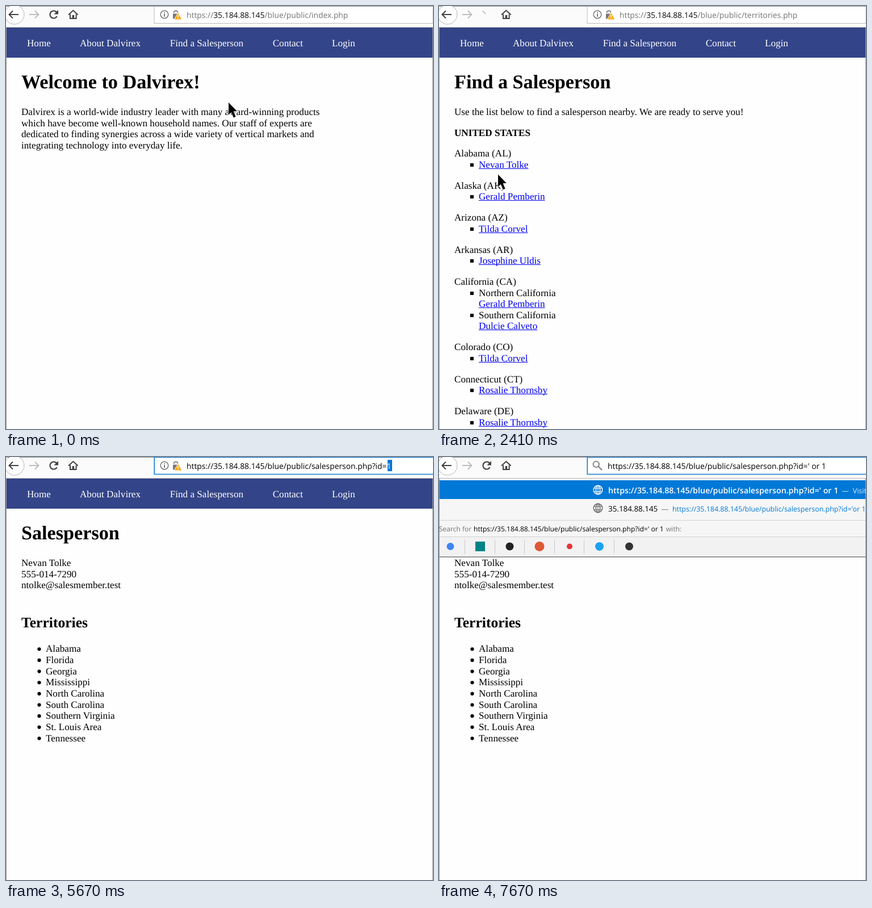
An HTML page with a canvas for the animation above (8 s loop, 752x745 px).

```html
<!DOCTYPE html>
<html lang="en">
<head>
<meta charset="utf-8">
<title>Find a Salesperson</title>
<style>
html, body { margin: 0; width: 100%; height: 100%; overflow: hidden; background: #fefefe; }
canvas { display: block; }
</style>
</head>
<body>
<canvas id="stage" width="752" height="745"></canvas>
<script>
const ctx = document.getElementById("stage").getContext("2d");
ctx.textRendering = "geometricPrecision";
const LOOP = 8000;
const SERIF = '"Liberation Serif", "Times New Roman", serif';
const UI = '"Open Sans", "Noto Sans", sans-serif';
const BODY = "17.14px " + SERIF;
const URL_FONT = "13.85px " + UI;
const LINE = 19.65, GAP = 17.07;
const NAVY = "#334488", BLUE = "#0078d7", GREY = "#737373", INK = "#404040";

const HOST = "35.184.88.145";
const DIR = "/blue/public/";
const PERSON_URL = "https://" + HOST + DIR + "salesperson.php?id=";

// Screen updates come in bursts: first time, last time, number of updates.
const BURSTS = [[0, 0, 1], [120, 260, 2], [550, 700, 2], [1260, 2280, 8], [2410, 3240, 7],
  [3500, 4500, 8], [4620, 5550, 8], [5670, 5670, 1], [6540, 7370, 7], [7670, 7670, 1]];

// Pointer path: time, x, y
const PATH = [[0, 392, 170], [120, 374, 122], [260, 357, 77], [549, 357, 77], [550, 357, 70],
  [700, 357, 66], [1420, 357, 66], [1990, 206, 235], [2135, 138, 284], [2280, 104, 298],
  [2700, 104, 294], [3240, 103, 272], [3650, 103, 272], [3930, 260, 210], [4220, 520, 95],
  [4500, 658, 32], [4640, 666, 28], [4890, 684, 16], [5550, 688, 15]];

function snap(t) {
  const [a, b, n] = BURSTS.filter(u => u[0] <= t).pop();
  if (n < 2) return a;
  const gap = (b - a) / (n - 1);
  return a + gap * Math.min(n - 1, Math.floor((t - a + 10) / gap));
}

function pointerAt(t) {
  const i = PATH.findIndex(p => p[0] > t);
  if (i < 0) return PATH[PATH.length - 1].slice(1);
  const [t0, x0, y0] = PATH[i - 1], [t1, x1, y1] = PATH[i];
  const k = (t - t0) / (t1 - t0);
  return [x0 + (x1 - x0) * k, y0 + (y1 - y0) * k];
}

// Returns the x where the text ends.
function text(str, x, y, font = BODY, color = "#000") {
  ctx.font = font;
  ctx.fillStyle = color;
  ctx.fillText(str, x, y);
  return x + ctx.measureText(str).width;
}

function rect(x, y, w, h, color) {
  ctx.fillStyle = color;
  ctx.fillRect(x, y, w, h);
}

function disc(x, y, r, color) {
  ctx.fillStyle = color;
  ctx.beginPath();
  ctx.arc(x, y, r, 0, 7);
  ctx.fill();
}

function ring(x, y, r, color, width = 1, from = 0, to = Math.PI * 2) {
  ctx.strokeStyle = color;
  ctx.lineWidth = width;
  ctx.beginPath();
  ctx.arc(x, y, r, from, to);
  ctx.stroke();
}

function line(points, color, width = 1) {
  ctx.strokeStyle = color;
  ctx.lineWidth = width;
  ctx.beginPath();
  points.forEach(p => ctx.lineTo(p[0], p[1]));
  ctx.stroke();
}

// The edge lies outside the fill.
function shape(points, fill, edge) {
  ctx.beginPath();
  points.forEach(p => ctx.lineTo(p[0], p[1]));
  ctx.closePath();
  if (edge) {
    ctx.strokeStyle = edge;
    ctx.lineWidth = 1.6;
    ctx.stroke();
  }
  ctx.fillStyle = fill;
  ctx.fill();
}

function dotted(x, y, w, h, color) {
  ctx.setLineDash([1, 1]);
  ctx.strokeStyle = color;
  ctx.lineWidth = 1;
  ctx.strokeRect(x + 0.5, y + 0.5, w, h);
  ctx.setLineDash([]);
}

function link(str, x, y) {
  const end = text(str, x, y, BODY, "#0000ee");
  rect(x, Math.round(y) + 1, end - x, 1, "#0000ee");
}

function title(str) {
  text(str, 27, 145, "bold 34.2px " + SERIF);
}

function nav(focused) {
  rect(0, 38, 752, 53, NAVY);
  [["Home", 37], ["About Dalvirex", 130], ["Find a Salesperson", 288.7], ["Contact", 469.7], ["Login", 574]]
    .forEach(([s, x]) => text(s, x, 71, BODY, "#fff"));
  if (focused) dotted(287, 55, 131, 20, "#fff");
}

function homePage() {
  title("Welcome to Dalvirex!");
  ["Dalvirex is a world-wide industry leader with many award-winning products",
   "which have become well-known household names. Our staff of experts are",
   "dedicated to finding synergies across a wide variety of vertical markets and",
   "integrating technology into everyday life."
  ].forEach((s, i) => text(s, 27, 192 + i * LINE));
}

const STATES = [
  ["Alabama (AL)", "Nevan Tolke"],
  ["Alaska (AK)", "Gerald Pemberin"],
  ["Arizona (AZ)", "Tilda Corvel"],
  ["Arkansas (AR)", "Josephine Uldis"],
  ["California (CA)", "Northern California|Gerald Pemberin", "Southern California|Dulcie Calveto"],
  ["Colorado (CO)", "Tilda Corvel"],
  ["Connecticut (CT)", "Rosalie Thornsby"],
  ["Delaware (DE)", "Rosalie Thornsby"]
];

function listPage(focused) {
  title("Find a Salesperson");
  text("Use the list below to find a salesperson nearby. We are ready to serve you!", 27, 192);
  text("UNITED STATES", 27, 228.7, "bold " + BODY);
  let y = 265.4;
  for (const [state, ...items] of STATES) {
    text(state, 27, y);
    for (const item of items) {
      const parts = item.split("|");
      rect(55, Math.round(y + LINE) - 8, 6, 6, "#000");
      parts.forEach((s, i) => {
        y += LINE;
        if (i === parts.length - 1) link(s, 70, y);
        else text(s, 70, y);
      });
    }
    y += LINE + GAP;
  }
  if (focused) dotted(69, 269, 90, 20, "#0000ee");
}

function personPage() {
  title("Salesperson");
  ["Nevan Tolke", "555-014-7290", "ntolke@salesmember.test"]
    .forEach((s, i) => text(s, 27, 192 + i * LINE));
  text("Territories", 27, 300, "bold 25.6px " + SERIF);
  ["Alabama", "Florida", "Georgia", "Mississippi", "North Carolina", "South Carolina",
   "Southern Virginia", "St. Louis Area", "Tennessee"].forEach((s, i) => {
    const y = 343.3 + i * LINE;
    text(s, 70, y);
    disc(58.5, y - 5, 3.1, "#000");
  });
}

function arrowIcon(x, dir, color) {
  line([[x - 8 * dir, 15], [x + 8 * dir, 15]], color, 2);
  line([[x + 2 * dir, 8.5], [x + 8.5 * dir, 15], [x + 2 * dir, 21.5]], color, 2);
}

function reloadIcon(state) {
  if (state === "stop") {
    line([[77, 8.5], [90, 21.5]], INK, 2);
    line([[90, 8.5], [77, 21.5]], INK, 2);
  } else if (state === "fading") {
    line([[76.5, 8.5], [82, 14]], "#aaa", 1.3);
  } else {
    ring(84, 15, 6.5, INK, 2.2, 0.5, 5.6);
    shape([[92, 7], [92, 14.5], [84.5, 14.5]], INK);
  }
}

function homeIcon() {
  line([[110, 15.5], [118.3, 7.8], [126.6, 15.5]], INK, 2);
  line([[113, 14.5], [113, 22], [123.6, 22], [123.6, 14.5]], INK, 2);
  rect(116.7, 16, 3.4, 6, INK);
}

function siteIcons() {
  ring(279, 15, 6.8, "#666", 1.3);
  rect(278.2, 13.8, 1.7, 5.2, "#666");
  rect(278.2, 10.8, 1.7, 1.8, "#666");
  ring(299, 12, 3.6, "#777", 1.8, Math.PI, Math.PI * 2);
  rect(294, 13.5, 11, 9, "#777");
  shape([[303, 12.5], [309.3, 23.5], [296.7, 23.5]], "#ffa812", "#fff");
  rect(302.3, 16, 1.4, 3.8, "#fff");
  rect(302.3, 20.7, 1.4, 1.4, "#fff");
}

function searchIcon() {
  ring(276.8, 12.8, 5.2, "#888", 2);
  line([[280.6, 16.6], [287, 23]], "#888", 2.4);
}

function globe(x, y, color) {
  ring(x, y, 7.8, color, 1.4);
  ctx.beginPath();
  ctx.ellipse(x, y, 3.7, 7.8, 0, 0, 7);
  ctx.stroke();
  line([[x, y - 8], [x, y + 8]], color, 1.1);
  [-3, 3].forEach(d => line([[x - 7.2, y + d], [x + 7.2, y + d]], color, 1.1));
}

function toolbar(t) {
  const focus = t >= 5150, typing = t >= 6540;
  rect(0, 0, 752, 37, "#fbfbfb");
  rect(0, 37, 752, 1, "#b8b8b8");
  rect(0, 0, 752, 1, "#8c8c8c");
  disc(15, 15, 17, "#fff");
  ring(15, 15, 17, "#b4b4b4");
  arrowIcon(14, -1, INK);
  arrowIcon(49, 1, "#bdbdbd");
  const loading = (t >= 1400 && t < 2400) || (t >= 3640 && t < 4490);
  const fading = (t >= 2400 && t < 2540) || (t >= 4490 && t < 4610);
  reloadIcon(loading ? "stop" : fading ? "fading" : "ready");
  homeIcon();

  if (focus) {
    rect(262, 31, 490, 2, "#ececec");
    rect(260.5, 0, 492, 31, BLUE);
    rect(262, 1.2, 490, 28.5, "#fff");
  } else {
    rect(260.5, 1, 492, 30, "#bbb");
    rect(261.5, 1, 490, 29, "#fff");
  }
  if (typing) {
    searchIcon();
    const end = text(PERSON_URL + typed(t), 297, 21, URL_FONT);
    if (t < 7670) rect(Math.round(end), 5, 1, 20, "#000");
    return;
  }
  siteIcons();
  if (focus) {
    const end = text(PERSON_URL, 318, 21, URL_FONT);
    const marked = t >= 5410;
    if (marked) rect(672, 5, 8, 20, BLUE);
    text("1", Math.min(end, 672), 21, URL_FONT, marked ? "#fff" : "#000");
    return;
  }
  const page = t < 1400 ? "index.php" : t < 3640 ? "territories.php" : "salesperson.php?id=1";
  let x = text("https://", 318, 21, URL_FONT, GREY);
  x = text(HOST, x, 21, URL_FONT, "#0c0c0d");
  text(DIR + page, x, 21, URL_FONT, GREY);
}

function typed(t) {
  const count = 1 + Math.floor((t - 6540) / 138);
  return "' or 1".slice(0, count);
}

// One plain shape per search engine: x, radius, colour
const ENGINES = [[20, 6.5, "#4285f4"], [72.5, 8.5, "#008485"], [124.5, 7, "#222"], [177, 8.5, "#de5833"],
  [230, 5, "#e53238"], [282.5, 7.5, "#1da1f2"], [335, 7, "#333"]];

function popup(t) {
  const entry = PERSON_URL + typed(t);
  const more = t >= 6810;
  const dy = more ? 32.5 : 0;
  const small = "12.06px " + UI;
  rect(0, 37, 752, 107 + dy, "#f6f6f6");
  rect(0, 37, 752, 1, "#b8b8b8");
  rect(0, 41, 752, 33, BLUE);
  globe(280, 58, "#fff");
  let x = text(entry, 298, 63.5, "600 14.2px " + UI, "#fff");
  x = text("—", x + 6, 63.5, "12.5px " + UI, "#d6eafa");
  text("Visit", x + 7, 63.5, "12.5px " + UI, "#d6eafa");
  if (more) {
    globe(280, 90, "#666");
    text(HOST, 298, 95.5, "13.4px " + UI);
    text("—", 391.5, 95.5, "12.5px " + UI, GREY);
    text(PERSON_URL + "'or 1", 411, 96, "12.4px " + UI, BLUE);
  }
  rect(0, Math.round(78 + dy), 752, 1, "#d2d2d2");
  text("Search for", 0, 98 + dy, small, GREY);
  x = text(entry.trimEnd(), 61, 98 + dy, small);
  text("with:", x + 4, 98 + dy, small, GREY);
  rect(0, Math.round(107 + dy), 752, 36, "#f2f2f2");
  rect(0, Math.round(107 + dy), 752, 1, "#d2d2d2");
  ENGINES.forEach(([ex, r, color], i) => {
    const y = 125 + dy;
    if (i === 1) rect(ex - r, y - r, r * 2, r * 2, color);
    else disc(ex, y, r, color);
    if (i < 6) rect(Math.round(45 + i * 52.6), y - 12, 1, 25, "#c8c8c8");
  });
  rect(0, Math.round(142 + dy), 752, 2, "#9a9a9a");
}

function arrowPointer() {
  shape([[0, 0], [0, 21.5], [4.8, 17.2], [8.8, 26.6], [12.6, 25], [8.6, 15.6], [14.8, 15.2]], "#000", "#fff");
}

function handPointer() {
  shape([[-1.6, 1], [0, 0], [1.6, 1], [1.8, 7], [4.5, 7.2], [7, 8.3], [8.8, 10], [8.8, 15], [6.8, 18.5],
    [6.8, 21.5], [-2.2, 21.5], [-2.4, 18.8], [-6, 13.5], [-5.6, 11.2], [-3.8, 11.4], [-1.8, 13.5]], "#fff", "#222");
  [1.8, 4.4, 6.8].forEach(x => line([[x, 8], [x, 12]], "#222"));
}

function beamPointer() {
  line([[0, -8], [0, 8]], "#000");
  [-8.5, 8.5].forEach(y => line([[-3, y], [3, y]], "#000"));
}

function pointer(t) {
  if (t >= 5670) return;
  const [x, y] = pointerAt(t);
  ctx.save();
  ctx.translate(x, y);
  const onNav = t >= 550 && t < 1500;
  const onName = t >= 2900 && t < 3700;
  if (onNav || onName) handPointer();
  else if (t > 4600 && y < 30) beamPointer();
  else arrowPointer();
  ctx.restore();
}

function draw(now) {
  const t = snap(now % LOOP);
  rect(0, 0, 752, 745, "#fefefe");
  if (t < 2130) homePage();
  else if (t < 4200) listPage(t >= 3500);
  else personPage();
  nav(t >= 1260 && t < 2130);
  toolbar(t);
  if (t >= 6540) popup(t);
  rect(0, 37, 1, 708, "#9a9a9a");
  rect(751, 37, 1, 708, "#9a9a9a");
  pointer(t);
  requestAnimationFrame(draw);
}
requestAnimationFrame(draw);
</script>
</body>
</html>
```
